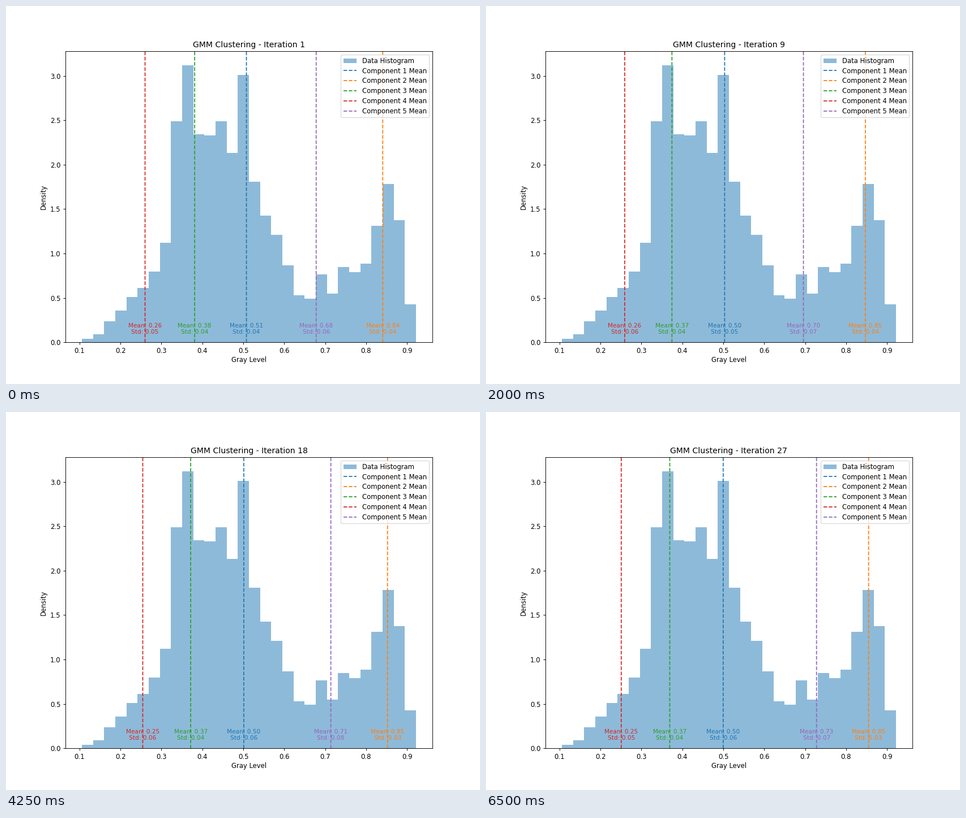
Animation, 837 px wide and 669 px high, one loop 6.75 s. Source, as a matplotlib script:

```python
import math

import matplotlib.pyplot as plt
import numpy as np
from matplotlib.animation import FuncAnimation

WIDTH, HEIGHT, DPI = 837, 669, 83.7
STEPS, INTERVAL = 27, 250

# Measured histogram: gray levels 27 to 235 of 255 in 30 bins
EDGES = np.linspace(27, 235, 31) / 255
DENSITY = [
    0.04, 0.09, 0.24, 0.36, 0.51, 0.61, 0.80, 1.12, 2.49, 3.119,
    2.34, 2.33, 2.49, 2.13, 3.01, 1.81, 1.425, 1.21, 0.87, 0.53,
    0.49, 0.765, 0.55, 0.845, 0.79, 0.885, 1.31, 1.78, 1.375, 0.43,
]


def settle(power):
    """Ease-out that slows down towards convergence."""
    return lambda t: 1 - (1 - t) ** power


class Component:
    """A mixture component whose mean and spread drift as the fit converges."""

    def __init__(self, mean, std, ease, kick=0, bulge=0):
        self.mean_range, self.std_range = mean, std
        self.ease, self.kick, self.bulge = ease, kick, bulge

    def blend(self, span, t):
        return span[0] + (span[1] - span[0]) * self.ease(t)

    def mean(self, step):
        drift = self.blend(self.mean_range, step / (STEPS - 1))
        return drift - self.kick * math.exp(-step)

    def std(self, step):
        t = step / (STEPS - 1)
        return self.blend(self.std_range, t) + self.bulge * math.sin(math.pi * t)


COMPONENTS = [
    Component((0.5076, 0.4997), (0.044, 0.058), math.sqrt),
    Component((0.8406, 0.8549), (0.0385, 0.031), settle(1.6)),
    Component((0.3812, 0.3692), (0.04, 0.04), math.sqrt),
    Component((0.2639, 0.2507), (0.0545, 0.0545), settle(1.2),
              kick=0.0039, bulge=0.004),
    Component((0.6780, 0.7277), (0.064, 0.074), settle(1.2), bulge=0.007),
]

plt.rcParams["font.family"] = "DejaVu Sans"
fig, ax = plt.subplots(
    figsize=((WIDTH + 1e-6) / DPI, (HEIGHT + 1e-6) / DPI), dpi=DPI)
centers = (EDGES[:-1] + EDGES[1:]) / 2
ax.hist(centers, bins=EDGES, weights=DENSITY, alpha=0.5,
        label="Data Histogram")
ax.set_xlabel("Gray Level", labelpad=3.2)
ax.set_ylabel("Density")
title = ax.set_title("")

lines, notes = [], []
for i, component in enumerate(COMPONENTS):
    x = component.mean(0)
    lines.append(ax.axvline(x, color=f"C{i}", linestyle="--", snap=False,
                            label=f"Component {i + 1} Mean"))
    notes.append(ax.text(x, 0.152, "", color=f"C{i}", fontsize=9,
                         ha="center", va="center", linespacing=1.08))
ax.legend(loc="upper right", labelspacing=0.41)


def update(step):
    title.set_text(f"GMM Clustering - Iteration {step + 1}")
    for component, line, note in zip(COMPONENTS, lines, notes):
        mean, std = component.mean(step), component.std(step)
        line.set_xdata([mean, mean])
        note.set_x(mean)
        note.set_text(f"Mean: {mean:.2f}\nStd: {std:.2f}")
    return [title, *lines, *notes]


anim = FuncAnimation(fig, update, frames=STEPS, interval=INTERVAL,
                     repeat=True, repeat_delay=0, blit=False)
plt.show()
```
